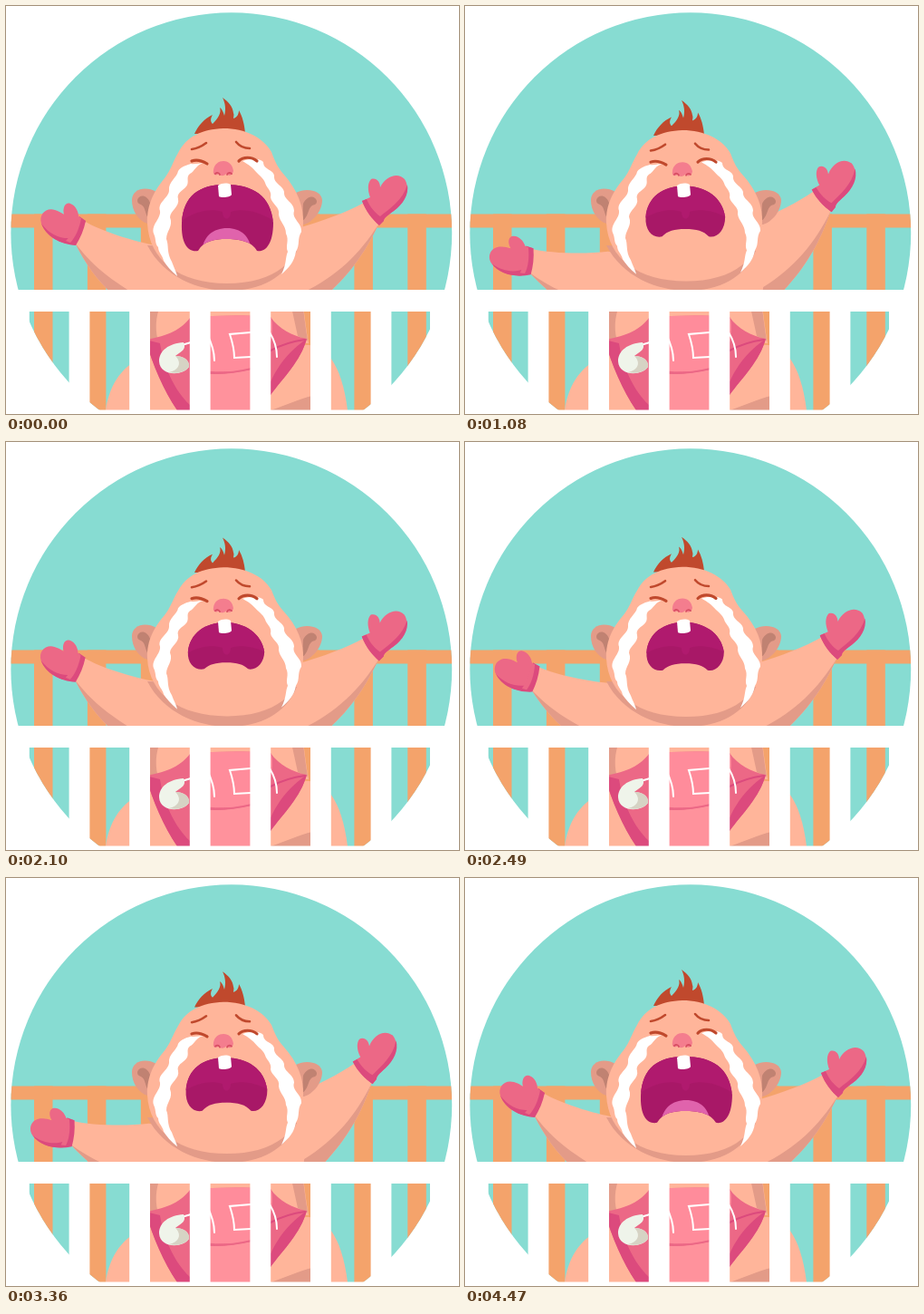
Recreate the animation shown at these times as an HTML page with a canvas. Size 500 by 450 pixels, loop 4500 ms.

```html
<!DOCTYPE html>
<html lang="en">
<head>
<meta charset="utf-8">
<title>Crying baby</title>
<style>
html, body { margin: 0; width: 100%; height: 100%; overflow: hidden; background: #fff; }
canvas { display: block; }
</style>
</head>
<body>
<canvas id="stage" width="500" height="450"></canvas>
<script>
const ctx = document.getElementById('stage').getContext('2d');
const LOOP = 4500;
const C = {
  teal: '#87dcd2', wood: '#f4a36b', skin: '#ffb59a', shade: '#e39b88', fold: '#c08272',
  pink: '#ec6886', deep: '#dc4a7d', panel: '#ff8c9b', light: '#ff929c', hair: '#c0492d',
  mouth: '#a81867', palate: '#b01a6e', tongue: '#e063ac', pin: '#eff4ea', nose: '#f47d8e'
};

const fill = (path, color) => {
  ctx.fillStyle = color;
  ctx.fill(new Path2D(path));
};
const line = (path, color, width) => {
  ctx.strokeStyle = color;
  ctx.lineWidth = width;
  ctx.stroke(new Path2D(path));
};
const rect = (color, x, y, w, h) => {
  ctx.fillStyle = color;
  ctx.fillRect(x, y, w, h);
};
const wave = phase => (1 - Math.cos(2 * Math.PI * phase)) / 2;

function turned(x, y, degrees, draw) {
  ctx.save();
  ctx.translate(x, y);
  ctx.rotate(degrees * Math.PI / 180);
  ctx.translate(-x, -y);
  draw();
  ctx.restore();
}

function crib() {
  rect(C.teal, 0, 0, 500, 450);
  rect(C.wood, 0, 229.5, 500, 15);
  for (let i = 0; i < 8; i++) rect(C.wood, 31 + i * 58.9, 229.5, 20.5, 221);
}

function lowerBody() {
  // belly and legs
  fill('M165 280 L322 280 C327 315 329 345 334 372 L160 372 Z', C.skin);
  fill('M322 280 C326 315 329 345 333 369 L322 364 C318 345 314 330 312 310 Z', C.shade);
  fill('M159 330 L170 330 C165 345 165 355 167 366 L159 368 Z', C.shade);
  fill('M110 446 C114 419 126 401 145 390 L162 370 L205 446 Z', C.skin);
  fill('M292 446 L292 425 L328 374 C350 372 370 390 377 446 Z', C.skin);
  fill('M292 446 C307 441 325 433 338 430 L338 446 Z', C.shade);
  // diaper with darker leg openings
  fill('M154 368 C180 364 194 356 203 344 C232 341 264 341 292 343 C301 356 316 364 332 367 C325 392 306 410 292 429 L284 446 L189 446 C174 424 162 396 154 368 Z', C.pink);
  fill('M154 368 L170 372 C174 398 186 424 203 440 L203 446 L189 446 C174 424 162 396 154 368 Z', C.deep);
  fill('M332 367 C325 392 306 410 292 429 L284 440 C290 412 304 386 332 367 Z', C.deep);
  fill('M203 344 C232 341 264 341 292 343 C296 350 293 380 284 396 C264 405 232 405 203 400 Z', C.panel);
  fill('M203 403 C225 408 247 406 270 401 L282 446 L210 446 Z', C.light);
  line('M203 402 C226 407 250 405 271 400', C.pink, 2);
  line('M330 368 C315 370 303 374 292 380', C.deep, 2);
  line('M270 360 L247 362 C250 371 252 379 252 388 L270 387', '#fff', 2);
  line('M222 362 C227 372 230 381 230 391', '#fff', 2);
  line('M291 360 C296 368 299 377 299 387', '#fff', 2);
  line('M184 377 L204 371', '#fff', 2);
  fill('M169 392 C169 380 180 372 196 371 C200 379 192 382 187 386 C195 386 203 390 202 398 C196 408 170 409 169 392 Z', C.pin);
  fill('M187 386 C195 386 203 390 202 398 C198 404 188 406 180 404 C190 402 195 394 187 386 Z', '#d6d3c4');
}

function leftArm() {
  fill('M86 237 C104 248 142 260 166 264 L215 290 L205 336 L140 323 L118 318 C100 302 88 285 76 261 Z', C.skin);
  fill('M76 261 C95 286 112 299 142 318 L118 318 C100 302 88 285 76 261 Z', C.shade);
  fill('M77 263 C60 263 44 254 39 240 C36 230 44 222 54 225 C58 226 61 228 64 230 C62 222 66 216 71 218 C77 220 80 227 80 232 L88 237 Z', C.pink);
  fill('M39 240 C48 252 60 257 72 256 C78 249 81 241 81 232 L88 237 C86 247 82 256 77 264 C60 263 44 254 39 240 Z', C.deep);
  fill('M72 249 C76 244 78 239 79 232 L83 234 C81 246 76 256 71 261 L66 259 C69 256 71 253 72 249 Z', C.pink);
}

function rightArm() {
  fill('M395 217 C377 227 350 237 322 245 L275 280 L290 326 L350 322 C378 298 396 273 411 241 Z', C.skin);
  fill('M411 241 C390 274 365 298 328 316 L326 324 L350 322 C378 298 396 273 411 241 Z', C.shade);
  fill('M393 215 L402 211 C399 203 399 195 403 191 C409 189 413 194 413 200 C419 188 432 183 440 191 C447 202 440 217 428 226 C421 231 417 234 417 237 L412 242 C404 235 397 226 393 215 Z', C.pink);
  fill('M443 197 C445 208 438 219 428 226 C421 231 417 234 417 237 L412 242 C404 235 397 226 393 215 L398 213 C402 222 407 228 413 232 C424 223 438 214 443 197 Z', C.deep);
}

function ears() {
  fill('M166 205 C154 198 139 202 139 214 C139 226 146 237 156 240 L172 240 Z', C.shade);
  fill('M145 214 C147 207 156 208 159 217 L159 236 C153 232 155 222 149 219 C146 218 145 217 145 214 Z', C.fold);
  fill('M320 206 C331 200 348 203 349 214 C349 226 339 238 329 241 L314 240 Z', C.shade);
  fill('M343 215 C341 208 332 209 328 218 L327 237 C334 233 333 223 338 220 C342 219 343 218 343 215 Z', C.fold);
}

function head() {
  fill('M208 141 C212 132 219 124 228 120 C225 125 226 128 228 130 C234 124 238 118 236 112 C239 114 240 118 241 121 C243 114 242 107 239 101 C246 106 250 111 251 118 C252 120 251 122 251 124 C255 123 257 119 257 115 C261 122 263 130 264 140 Z', C.hair);
  fill('M240 135 C264 135 284 145 293 161 C297 172 300 178 306 185 C322 203 329 222 328 240 C327 281 296 306 244 306 C191 306 158 280 156 240 C155 218 165 202 175 190 C182 181 184 172 190 162 C199 144 216 136 240 135 Z', C.skin);
  // tears
  fill('M219 173 C210 174 208 183 203 185 C198 189 203 194 199 199 C195 204 188 206 190 213 C192 221 181 226 181 233 C185 243 177 248 177 257 C180 264 177 272 183 282 C185 288 188 293 189 298 C182 292 177 286 174 281 C173 275 168 272 168 266 C164 262 166 257 163 251 C160 241 171 235 170 226 C167 216 180 212 180 203 C179 194 189 189 190 182 C193 177 201 175 204 174 C209 175 214 173 219 173 Z', '#fff');
  fill('M261 171 C270 168 280 168 284 172 C284 181 295 180 296 187 C295 196 306 198 307 205 C306 214 318 216 318 226 C315 235 327 239 326 249 C321 257 325 263 320 271 C318 282 313 288 304 296 C310 284 308 278 311 271 C308 264 313 259 309 251 C309 242 302 238 301 230 C303 222 293 218 292 211 C294 204 287 200 286 195 C284 190 281 188 277 184 C272 178 268 175 261 171 Z', '#fff');
  // brows, lids and nose
  line('M205 158 C212 157 217 154 221 151', C.hair, 2.6);
  line('M254 150 C258 155 263 157 269 157', C.hair, 2.6);
  line('M205 171 C210 169 217 171 222 174', C.hair, 3.2);
  line('M257 171 C262 166 271 166 277 171', C.hair, 3.2);
  fill('M229 181 C230 174 235 171 240 171 C246 171 250 175 251 182 C250 187 246 188 243 185 C240 188 237 188 235 185 C231 188 228 186 229 181 Z', C.nose);
  line('M231 185 C233 183 235 184 236 186 M244 186 C245 183 248 184 249 185', '#d84f63', 1.8);
}

function mouth(open) {
  const p = (closed, wide) => closed + (wide - closed) * open;
  const left = p(201, 194), right = p(285, 295), top = p(199, 197);
  const side = p(231, 239), low = p(251, 271), mid = p(243, 257);
  const shape = new Path2D(
    `M${left} ${side} C${left + 2} ${top + 12} ${left + 19} ${top} 242 ${top}` +
    ` C${right - 22} ${top} ${right - 3} ${top + 12} ${right} ${side}` +
    ` C${right} ${low - 8} ${right - 9} ${low + 1} ${right - 18} ${low - 1}` +
    ` C${right - 24} ${mid + 2} 256 ${mid} 243 ${mid}` +
    ` C231 ${mid} ${left + 24} ${mid + 2} ${left + 18} ${low - 1}` +
    ` C${left + 8} ${low + 1} ${left - 1} ${low - 7} ${left} ${side} Z`);
  ctx.save();
  ctx.clip(shape);
  rect(C.mouth, 180, 180, 130, 110);
  fill('M180 190 L310 190 L310 250 C290 228 264 222 248 227 C248 237 239 237 239 227 C222 222 199 228 180 250 Z', C.palate);
  ctx.translate(0, p(4, 0));
  fill('M216 274 C216 255 228 245 244 245 C260 245 271 255 271 274 Z', C.tongue);
  ctx.restore();
  fill('M234 198 C239 195 244 195 248 197 L249 208 C248 211 238 212 235 210 Z', '#fff');
}

function render(t) {
  const open = 1 - wave(t / 1500);
  const turn = 1975;
  const leftSwing = wave(t < turn ? t / turn : (t - turn) / (LOOP - turn));
  const rightSwing = wave(t / 2250 + 0.012);

  rect('#fff', 0, 0, 500, 450);
  ctx.lineCap = 'round';
  ctx.save();
  ctx.beginPath();
  ctx.arc(248.8, 250.6, 243.4, 0, 2 * Math.PI);
  ctx.clip();
  crib();
  lowerBody();
  turned(185, 295, -17 * leftSwing, leftArm);
  turned(275, 302, -6.3 * rightSwing, rightArm);
  fill('M156 264 C174 299 212 314 246 314 C280 314 309 300 321 270 Z', C.shade);
  ears();
  ctx.save();
  ctx.translate(0, 215);
  ctx.scale(1, 0.956 + 0.044 * open);
  ctx.translate(0, -215);
  head();
  ctx.restore();
  mouth(Math.pow(open, 1.7));
  ctx.restore();

  // front rail and bars
  rect('#fff', 0, 313, 500, 24);
  for (let i = 0; i < 8; i++) rect('#fff', 3 + i * 66.6, 325, 22.8, 125);
  rect('#fff', 468, 325, 32, 125);
  rect('#fff', 0, 445.5, 500, 5);
}

const start = performance.now();
function tick() {
  const elapsed = (performance.now() - start) % LOOP;
  render(Math.floor(elapsed / 30) * 30);
  requestAnimationFrame(tick);
}
tick();
</script>
</body>
</html>
```
